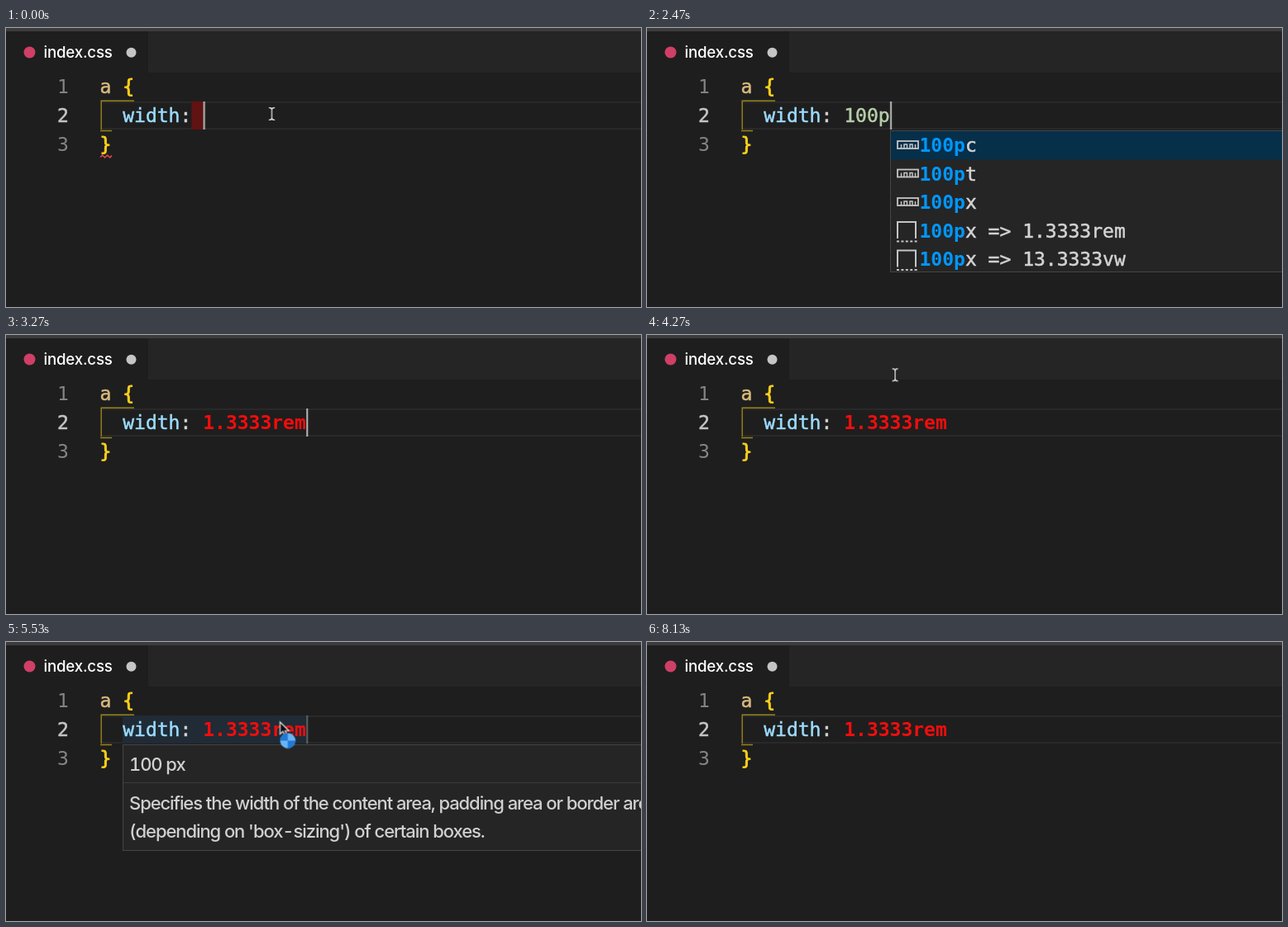
An HTML page that plays this animation: 768x338 px, repeating every 8190 ms.

```html
<!DOCTYPE html>
<html lang="en">
<head>
<meta charset="utf-8">
<title>Editor: px to rem</title>
<style>
html, body { margin: 0; width: 100%; height: 100%; overflow: hidden; background: #1e1e1e; }
svg { display: block; }
text { white-space: pre; }
.code { font: 23px "DejaVu Sans Mono", monospace; color: #d4d4d4; }
.code text, .code tspan { fill: currentColor; stroke: currentColor; stroke-width: .5px; }
.code .num { color: #858585; stroke: none; }
.code .on { color: #c6c6c6; stroke: currentColor; }
.code .brace { color: #ffd21c; stroke-width: .9px; }
.code .hit { color: #0097fb; font-weight: bold; stroke: none; }
.code .rem { color: #f20d0d; font-weight: bold; stroke: none; }
.sel { color: #d7ba7d; }
.prop { color: #9cdcfe; }
.val { color: #b5cea8; }
.plain { color: #d4d4d4; }
.ui { font: 500 22px Inter, sans-serif; font-variant-numeric: tabular-nums; letter-spacing: -1.08px; fill: #d0d0d0; }
.tab { font: 500 18.7px Inter, sans-serif; letter-spacing: -.22px; fill: #fff; }
.icon { fill: none; stroke: #c5c5c5; stroke-width: 2; }

/* One clock for everything: 8190 ms */
.a { animation: 8190ms step-end infinite; }
.caret { animation-name: caret; }
.space { animation-name: space; }
.typed { animation-name: typed; }
.rem { animation-name: rem; }
.error { animation-name: error; }
.list { animation-name: list; }
.pick { animation-name: pick; }
.hover { animation-name: hover; }
.beam { animation-name: beam; }
.arrow { animation-name: arrow; }
.blink { animation-name: blink; animation-timing-function: ease-in-out; }
.mouse { animation-name: mouse; animation-timing-function: ease-in-out; }

@keyframes caret {
  0% { transform: translateX(238.45px); }
  11.355% { transform: translateX(252.3px); }
  15.385% { transform: translateX(266.15px); }
  17.827% { transform: translateX(280px); }
  22.833% { transform: translateX(293.85px); }
  39.194%, 100% { transform: translateX(363.1px); }
}
@keyframes blink {
  0%, 6.227% { opacity: 1; }
  8.669%, 11.354% { opacity: 0; }
  11.355%, 46.886% { opacity: 1; }
  49.328%, 54.212% { opacity: 0; }
  56.654%, 59.096% { opacity: 1; }
  61.538%, 66.422% { opacity: 0; }
  68.864%, 71.306% { opacity: 1; }
  73.748%, 78.632% { opacity: 0; }
  81.074%, 83.516% { opacity: 1; }
  85.958%, 90.842% { opacity: 0; }
  93.284%, 95.726% { opacity: 1; }
  98.168%, 100% { opacity: 0; }
}
@keyframes space { 0% { opacity: 1; } 11.355%, 100% { opacity: 0; } }
@keyframes error { 0% { opacity: 1; } 23.2%, 100% { opacity: 0; } }
@keyframes typed { 0% { opacity: 1; } 39.194%, 100% { opacity: 0; } }
@keyframes rem { 0% { opacity: 0; } 39.194%, 100% { opacity: 1; } }
@keyframes list { 0% { opacity: 0; } 23.565% { opacity: 1; } 39.194%, 100% { opacity: 0; } }
@keyframes pick {
  0% { transform: none; }
  31.746% { transform: translateY(34.5px); }
  34.188% { transform: translateY(69px); }
  36.63%, 100% { transform: translateY(103.5px); }
}
@keyframes hover { 0% { opacity: 0; } 63.49% { opacity: 1; } 90.96%, 100% { opacity: 0; } }
@keyframes beam {
  0% { opacity: 1; }
  11.355% { opacity: 0; }
  50.06% { opacity: 1; }
  54.33% { opacity: 0; }
  72.04% { opacity: 1; }
  92.31%, 100% { opacity: 0; }
}
@keyframes arrow { 0% { opacity: 0; } 54.33% { opacity: 1; } 72.04%, 100% { opacity: 0; } }
@keyframes mouse {
  0%, 50.06% { transform: translate(321.5px, 104px); }
  52.26% { transform: translate(300px, 48px); }
  56.41% { transform: translate(331px, 106px); }
  58.61%, 60.93% { transform: translate(331px, 100.5px); }
  64.71%, 71.795% { transform: translate(331.5px, 96.5px); }
  75.09% { transform: translate(420px, 215px); }
  79.98%, 89.62% { transform: translate(715.5px, 73px); }
  92.31%, 100% { transform: translate(790px, 80px); }
}
</style>
</head>
<body>
<svg width="768" height="338" viewBox="0 0 768 338">
  <defs>
    <clipPath id="left"><rect class="a caret" x="-200" y="85" width="200" height="40"/></clipPath>
    <g id="ruler" class="icon">
      <rect x="303" y="-5" width="25" height="9" stroke-width="1.8"/>
      <path d="M307.5 4V-1M311 4V-1H314.5V4M318 4V-1H321V4M324.5 4V-1" stroke-width="1.5"/>
    </g>
    <g id="snippet" class="icon">
      <path d="M303 10V-10H325V10"/>
      <path d="M302 13.5H327" stroke-dasharray="3 2.4"/>
    </g>
    <path id="ibeam" d="M-3.5 -7.5Q0 -7.5 0 -5Q0 -7.5 3.5 -7.5M0 -5V5M-3.5 7.5Q0 7.5 0 5Q0 7.5 3.5 7.5"/>
  </defs>

  <rect width="768" height="338" fill="#1e1e1e"/>
  <rect x="172" y="4" width="596" height="50" fill="#252526"/>
  <rect width="768" height="4" fill="#3c3c3c"/>
  <circle cx="28.5" cy="29.5" r="7" fill="#cf3f66"/>
  <text class="tab" x="45.5" y="36">index.css</text>
  <circle cx="151.5" cy="29.7" r="6" fill="#c5c5c5"/>

  <path d="M115 90H768M115 122H768" stroke="#292929" stroke-width="2"/>
  <path d="M155 88.3H115.2V123M114 124.5H128" fill="none" stroke="#98831a" stroke-width="1.4"/>
  <rect class="a hover" x="141" y="89" width="222.5" height="34" fill="#202b36"/>
  <rect class="a space" x="224.4" y="89" width="14.4" height="34" fill="#611212"/>

  <g class="code">
    <text class="num" x="62" y="78.8">1</text>
    <text class="num on" x="62" y="114.2">2</text>
    <text class="num" x="62" y="148.7">3</text>
    <text class="sel" x="113.5" y="78.8">a</text>
    <text class="brace" x="141.2" y="78.8">{</text>
    <text class="prop" x="141.2" y="114.2">width<tspan class="plain">:</tspan></text>
    <text class="brace" x="113.5" y="148.7">}</text>
    <g clip-path="url(#left)"><text class="a typed val" x="238.2" y="114.2">100p</text></g>
    <text class="a rem" x="238.2" y="114.2">1.3333rem</text>
  </g>
  <path class="a error" d="M114 156.5l2.6-2.5 3 3 3-3 3 3 2.4-2.4" fill="none" stroke="#e5484d" stroke-width="1.5"/>
  <g class="a caret"><rect class="a blink" x=".2" y="89" width="2" height="34" fill="#b9bab8"/></g>

  <g class="a list">
    <rect x="294.5" y="124.5" width="490" height="171" fill="#252526" stroke="#454545"/>
    <rect class="a pick" x="295" y="125" width="473" height="34.5" fill="#062f4a"/>
    <g class="code">
      <text x="329.5" y="150.3"><tspan class="hit">100p</tspan>c</text>
      <text x="329.5" y="184.8"><tspan class="hit">100p</tspan>t</text>
      <text x="329.5" y="219.3"><tspan class="hit">100p</tspan>x</text>
      <text x="329.5" y="253.8"><tspan class="hit">100p</tspan>x =&gt; 1.3333rem</text>
      <text x="329.5" y="288.3"><tspan class="hit">100p</tspan>x =&gt; 13.3333vw</text>
    </g>
    <use href="#ruler" y="142"/>
    <use href="#ruler" y="176.5"/>
    <use href="#ruler" y="211"/>
    <use href="#snippet" y="245"/>
    <use href="#snippet" y="279.5"/>
  </g>

  <g class="a hover">
    <rect x="141.5" y="124.5" width="650" height="128" fill="#252526" stroke="#454545"/>
    <path d="M142 170.5H768" stroke="#3b3b3c"/>
    <g class="ui">
      <text x="149" y="156">100 px</text>
      <text x="149" y="203">Specifies the width of the content area, padding area or border area</text>
      <text x="149" y="237">(depending on 'box-sizing') of certain boxes.</text>
    </g>
  </g>

  <g class="a mouse">
    <g class="a beam" fill="none">
      <use href="#ibeam" stroke="#111" stroke-width="3"/>
      <use href="#ibeam" stroke="#e2e2e2" stroke-width="1.4"/>
    </g>
    <g class="a arrow">
      <path d="M0 .5V15L3.4 11.8L5.8 17L8.2 16L6 11H10.6Z" fill="#0c0c0c" stroke="#e8e8e8" stroke-width="1.2"/>
      <g transform="translate(9.3 23)">
        <circle r="9.3" fill="#68b5f3"/>
        <path d="M0 0V-9.3A9.3 9.3 0 0 0 -9.3 0ZM0 0V9.3A9.3 9.3 0 0 0 9.3 0Z" fill="#2279d6"/>
      </g>
    </g>
  </g>
</svg>
</body>
</html>
```
